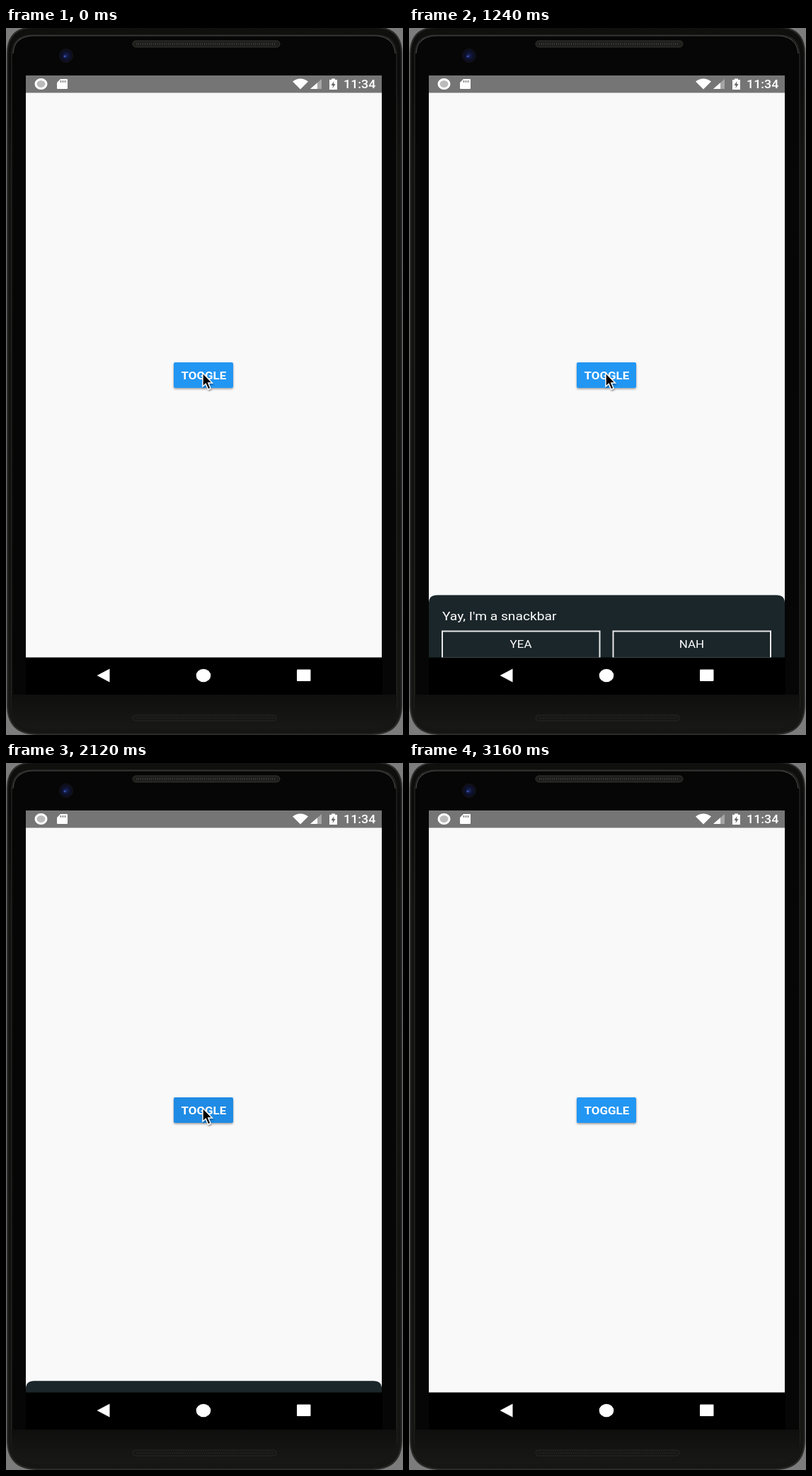
These frames come from a looping animation (561 px wide and 998 px high, 3200 ms). An HTML page:

```html
<!DOCTYPE html>
<html lang="en">
<head>
<meta charset="utf-8">
<title>Snackbar toggle</title>
<style>
  html, body { margin: 0; width: 100%; height: 100%; overflow: hidden; background: #7c7c7c; }
  svg { display: block; width: 561px; height: 998px; }
  text { font-family: Roboto, "Liberation Sans", sans-serif; fill: #fff; }
  .mid { text-anchor: middle; }
</style>
</head>
<body>
<svg viewBox="0 0 561 998">
  <defs>
    <linearGradient id="body" x2="0" y2="1">
      <stop offset="0" stop-color="#10100f"/>
      <stop offset=".06" stop-color="#0a0a0a"/>
      <stop offset=".2" stop-color="#141413"/>
      <stop offset=".7" stop-color="#121211"/>
      <stop offset="1" stop-color="#161615"/>
    </linearGradient>
    <linearGradient id="chin" x2="0" y2="1">
      <stop offset="0" stop-color="#0f0f0e"/>
      <stop offset="1" stop-color="#181817"/>
    </linearGradient>
    <radialGradient id="lens">
      <stop offset="0" stop-color="#1c2a66"/>
      <stop offset=".4" stop-color="#101538"/>
      <stop offset="1" stop-color="#0b0b14"/>
    </radialGradient>
    <filter id="shadow" x="-20%" y="-30%" width="140%" height="170%">
      <feDropShadow dx="0" dy="1.5" stdDeviation="1.6" flood-opacity=".4"/>
    </filter>
    <filter id="soft" x="-40%" y="-40%" width="200%" height="200%">
      <feDropShadow dx="1" dy="2" stdDeviation="1.3" flood-opacity=".35"/>
    </filter>
    <clipPath id="screen"><rect x="28" y="67" width="503" height="822"/></clipPath>
  </defs>

  <!-- phone body -->
  <path d="M2 36Q2 -1 40 -1H521Q559 -1 559 36V955Q559 997 517 997H44Q2 997 2 955Z" fill="url(#body)" stroke="#2b2b29" stroke-width="2"/>
  <path d="M8 960V40Q8 10 38 10H522Q552 10 552 40V960" fill="#060606" stroke="#252523" stroke-width="1.3"/>
  <path d="M10 36Q11 12 38 11H522Q548 12 550 36" fill="none" stroke="#484848" stroke-width="1.2"/>
  <path d="M8 941H552V952Q552 989 515 989H45Q8 989 8 952Z" fill="url(#chin)"/>
  <rect x="179" y="18" width="208" height="9" rx="4.5" fill="#1e1e1c" stroke="#353532"/>
  <path d="M184 22.5H382" stroke="#3c3c37" stroke-width="3" stroke-dasharray="1 2"/>
  <rect x="179" y="970" width="203" height="8" rx="4" fill="#171716" stroke="#262624"/>
  <path d="M184 974H378" stroke="#292926" stroke-width="2" stroke-dasharray="1 2"/>
  <circle cx="85" cy="39" r="9.5" fill="url(#lens)" stroke="#15151c"/>
  <circle cx="83" cy="40" r="1.6" fill="#3a50ac"/>

  <!-- screen and status bar -->
  <rect x="28" y="67" width="503" height="822" fill="#f9f9fa"/>
  <rect x="28" y="67" width="503" height="24.5" fill="#757575"/>
  <ellipse cx="49.5" cy="79" rx="7.5" ry="6.5" fill="#bbb" stroke="#fff" stroke-width="3"/>
  <path d="M77 72H86Q87 72 87 73V85Q87 86 86 86H73Q72 86 72 85V77Z" fill="#fff"/>
  <path d="M77.5 74V77M80.5 74V77M83.5 74V77" stroke="#757575" stroke-width="1.4"/>
  <path d="M405 75.5Q416 67.5 427 75.5L416 86.5Z" fill="#fff"/>
  <path d="M430 86H446V72Z" fill="#a5a5a5"/>
  <path d="M430 86H440V77.2Z" fill="#fff"/>
  <path d="M460 73V71.5H465V73H468V87H457V73Z" fill="#fff"/>
  <path d="M463.5 75L459.5 81H462L461.5 85L465.5 79H463Z" fill="#666"/>
  <g transform="translate(477 84.5) scale(1.13 1)"><text font-size="15.8" font-weight="500">11:34</text></g>

  <!-- toggle button -->
  <rect x="237" y="472" width="84" height="36" rx="2" fill="#2196f3" filter="url(#shadow)"/>
  <rect id="ripple" x="237" y="472" width="84" height="36" rx="2" fill="#002f60" opacity="0"/>
  <g transform="translate(279.3 495.7) scale(1.13 1)"><text class="mid" font-size="15" font-weight="700">TOGGLE</text></g>

  <g clip-path="url(#screen)">
    <g id="bar">
      <path d="M28 108V11Q28 0 40 0H519Q531 0 531 11V108Z" fill="#1b262a"/>
      <g transform="translate(47 35) scale(1.13 1)"><text font-size="17">Yay, I'm a snackbar</text></g>
      <path d="M47 51H269.5V89H47ZM288.5 51H511V89H288.5Z" fill="none" stroke="#e6e8e8" stroke-width="2"/>
      <g transform="translate(158 74.5) scale(1.13 1)"><text class="mid" font-size="15">YEA</text></g>
      <g transform="translate(399.5 74.5) scale(1.13 1)"><text class="mid" font-size="15">NAH</text></g>
    </g>
  </g>

  <!-- navigation bar -->
  <path d="M28 888.5H532V941H28Z"/>
  <g fill="#fff">
    <path d="M128.5 914L146.5 904.5V923.5Z"/>
    <ellipse cx="279" cy="914" rx="10.3" ry="9.3"/>
    <rect x="411" y="905.5" width="19.5" height="16.5" rx="1"/>
  </g>

  <path id="cursor" d="M0 0V19L4.3 15.2L7.6 23L11 21.6L7.8 14H13.5Z" fill="#000" stroke="#fff" stroke-width="1.4" filter="url(#soft)"/>
</svg>
<script>
  const LOOP = 3200, STEP = 40, BAR_HEIGHT = 107, SCREEN_END = 889;
  const [bar, ripple, cursor] = ['bar', 'ripple', 'cursor'].map(id => document.getElementById(id));

  const progress = (t, from, to) => Math.min(1, Math.max(0, (t - from) / (to - from)));
  const easeInOut = p => p < .5 ? 2 * p * p : 1 - 2 * (1 - p) ** 2;
  const mix = (a, b, p) => a + (b - a) * p;
  const press = (t, down, up, end) => progress(t, down, down + 60) - progress(t, up, end);

  function cursorAt(t) {
    const away = easeInOut(progress(t, 2160, 2360));
    const exit = progress(t, 2400, 2680) ** 2;
    return [mix(278, 345, away) + 235 * exit, mix(487, 454, away) - 110 * exit];
  }

  function draw(t) {
    const shown = easeInOut(progress(t, 1000, 1340)) - easeInOut(progress(t, 1875, 2215));
    bar.setAttribute('transform', `translate(0 ${SCREEN_END - BAR_HEIGHT * shown})`);
    const dark = press(t, 860, 1000, 1200) + press(t, 1760, 2020, 2460);
    ripple.setAttribute('opacity', .13 * dark);
    cursor.setAttribute('transform', `translate(${cursorAt(t)})`);
    cursor.style.display = t < 2680 ? '' : 'none';
  }

  const start = performance.now();
  function tick() {
    const t = (performance.now() - start) % LOOP;
    draw(Math.floor(t / STEP) * STEP);
    requestAnimationFrame(tick);
  }
  tick();
</script>
</body>
</html>
```
